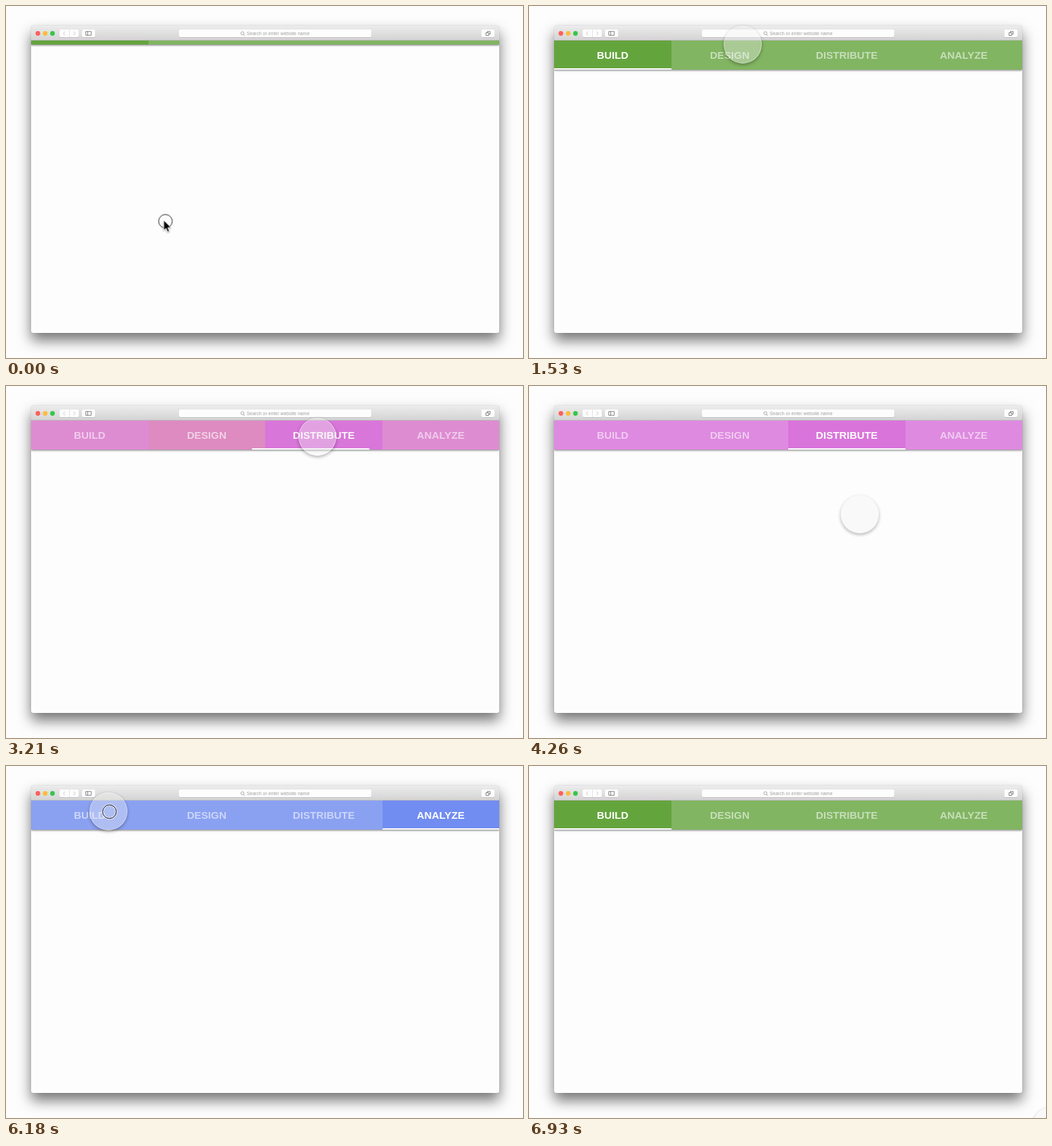
Write an HTML page that moves like this. It is 762 px wide and 520 px high and loops after 7520 ms.

```html
<!DOCTYPE html>
<html lang="en">
<head>
<meta charset="utf-8">
<title>Tab bar</title>
<style>
@property --on { syntax: "<number>"; inherits: true; initial-value: 0; }

html, body { margin: 0; width: 100%; height: 100%; overflow: hidden; background: #fdfdfd; }
body { position: relative; font-family: "Liberation Sans", Arial, sans-serif; }
body * { box-sizing: border-box; }

.bar, .ink, .tab, .pointer, .ring, .arrow, .touch {
  animation: 7520ms ease infinite both;
}

.window {
  position: absolute; left: 37px; top: 29px; width: 690px; height: 454px;
  border-radius: 4px 4px 3px 3px; overflow: hidden; background: #fdfdfd;
  box-shadow: 0 11px 20px rgba(0,0,0,.54), 0 0 1px rgba(0,0,0,.45);
}
.chrome { position: absolute; left: 0; top: 0; display: block; }

.bar {
  position: absolute; left: 0; top: 22px; width: 100%; height: 43px; overflow: hidden;
  box-shadow: 0 1px 3px rgba(0,0,0,.55);
  animation-name: grow, tint;
}
.tab {
  position: absolute; top: 0; width: 172.5px; height: 43px;
  font: bold 15.2px/43px "Liberation Sans", Arial, sans-serif; text-align: center;
  color: rgba(255,255,255,calc(.56 + .44 * var(--on)));
}
.tab::before {
  content: ""; position: absolute; inset: 0; background: var(--c); opacity: var(--on);
}
.tab span { position: relative; }
.tab:nth-child(1) { left: 0; --c: #64a43d; animation-name: build; }
.tab:nth-child(2) { left: 172.5px; --c: #d28040; animation-name: design; }
.tab:nth-child(3) { left: 345px; --c: #d974db; animation-name: distribute; }
.tab:nth-child(4) { left: 517.5px; --c: #718df1; animation-name: analyze; }
.ink {
  position: absolute; left: 0; top: 41px; width: 172.5px; height: 2px; background: #fff;
  animation-name: slide;
}

.pointer {
  position: absolute; left: 0; top: 0; width: 0; height: 0;
  animation-name: travel; animation-timing-function: ease-in-out;
}
.touch {
  position: absolute; left: -28px; top: -28px; width: 56px; height: 56px; border-radius: 50%;
  background: rgba(242,242,242,.36); border: 1px solid rgba(255,255,255,.35);
  box-shadow: 0 2px 5px rgba(0,0,0,.32);
  animation-name: touch; animation-timing-function: linear;
}
.ring {
  position: absolute; left: -9.5px; top: -10.5px; width: 21px; height: 21px; border-radius: 50%;
  border: 1.3px solid #111;
  box-shadow: 0 0 0 1px rgba(255,255,255,.6), inset 0 0 0 1px rgba(255,255,255,.8);
  animation-name: press; animation-timing-function: step-end;
}
.arrow {
  position: absolute; left: -3.5px; top: -3px; overflow: visible;
  filter: drop-shadow(0 1px 1px rgba(0,0,0,.35));
  animation-name: arrow; animation-timing-function: linear;
}

@keyframes grow {
  0%, 16.22% { height: 6px; }
  19.95%, 100% { height: 43px; }
}
@keyframes tint {
  0%, 25.53% { background-color: #81b562; }
  29.52%, 40.29% { background-color: #dc9866; }
  44.28%, 62.63% { background-color: #de8ae0; }
  66.62%, 83.91% { background-color: #8aa1f2; }
  87.9%, 100% { background-color: #81b562; }
}
@keyframes build {
  0%, 25.53% { --on: 1; }
  29.52%, 83.91% { --on: 0; }
  87.9%, 100% { --on: 1; }
}
@keyframes design {
  0%, 25.53% { --on: 0; }
  29.52%, 40.29% { --on: 1; }
  44.28%, 100% { --on: 0; }
}
@keyframes distribute {
  0%, 40.29% { --on: 0; }
  44.28%, 62.63% { --on: 1; }
  66.62%, 100% { --on: 0; }
}
@keyframes analyze {
  0%, 62.63% { --on: 0; }
  66.62%, 83.91% { --on: 1; }
  87.9%, 100% { --on: 0; }
}
@keyframes slide {
  0%, 25.53% { transform: none; }
  29.52%, 40.29% { transform: translateX(172.5px); }
  44.28%, 62.63% { transform: translateX(345px); }
  66.62%, 83.91% { transform: translateX(517.5px); }
  87.9%, 100% { transform: none; }
}
@keyframes travel {
  0%, .7% { transform: translate(233.5px, 317.5px); }
  3.06%, 9.3% { transform: translate(314px, 287.5px); }
  11.7%, 14% { transform: translate(369px, 178px); }
  17%, 21.14% { transform: translate(315px, 57px); }
  24%, 30.32% { transform: translate(305px, 66px); }
  33.24%, 47.2% { transform: translate(459px, 75px); }
  54.39%, 56.5% { transform: translate(487px, 190px); }
  60%, 69% { transform: translate(609px, 87px); }
  70.61%, 74.3% { transform: translate(647px, 334px); }
  79% { transform: translate(172px, 43px); }
  82%, 88.6% { transform: translate(151px, 67px); }
  92.1%, 100% { transform: translate(770px, 532px); }
}
@keyframes press {
  0% { opacity: 1; }
  1.46% { opacity: 0; }
  24.87% { opacity: 1; }
  26.46% { opacity: 0; }
  39.63% { opacity: 1; }
  41.22% { opacity: 0; }
  61.17% { opacity: 1; }
  62.77% { opacity: 0; }
  82.05% { opacity: 1; }
  83.78%, 100% { opacity: 0; }
}
@keyframes arrow {
  0%, 5.2% { opacity: 1; }
  6.2%, 100% { opacity: 0; }
}
@keyframes touch {
  0%, 5.2% { opacity: 0; }
  6.2%, 100% { opacity: 1; }
}
</style>
</head>
<body>
<div class="window">
  <div class="bar">
    <div class="tab"><span>BUILD</span></div>
    <div class="tab"><span>DESIGN</span></div>
    <div class="tab"><span>DISTRIBUTE</span></div>
    <div class="tab"><span>ANALYZE</span></div>
    <div class="ink"></div>
  </div>
  <svg class="chrome" width="690" height="22" viewBox="37 29 690 22">
    <defs>
      <linearGradient id="metal" x2="0" y2="1">
        <stop stop-color="#ececec"/><stop offset="1" stop-color="#d3d3d3"/>
      </linearGradient>
    </defs>
    <rect x="37" y="29" width="690" height="22" fill="url(#metal)"/>
    <rect x="37" y="50" width="690" height="1" fill="#bdbdbd"/>
    <circle cx="47" cy="40.5" r="3.4" fill="#fc605c"/>
    <circle cx="57.8" cy="40.5" r="3.4" fill="#fdbc40"/>
    <circle cx="68.5" cy="40.5" r="3.4" fill="#34c648"/>
    <g fill="#bcbcbc">
      <rect x="79" y="35.4" width="28.5" height="11.3" rx="2"/>
      <rect x="112" y="35.4" width="19.5" height="11.3" rx="2"/>
      <rect x="255" y="35.4" width="283.5" height="11.3" rx="2"/>
      <rect x="700.5" y="35.4" width="19.5" height="11.3" rx="2"/>
    </g>
    <g fill="#fdfdfd">
      <rect x="79" y="34.8" width="28.5" height="11.3" rx="2"/>
      <rect x="112" y="34.8" width="19.5" height="11.3" rx="2"/>
      <rect x="255" y="34.8" width="283.5" height="11.3" rx="2"/>
      <rect x="700.5" y="34.8" width="19.5" height="11.3" rx="2"/>
    </g>
    <path d="M93.5 35v11" stroke="#dcdcdc" stroke-width=".8"/>
    <path d="M87 37.7l-2.4 2.8 2.4 2.8M99.6 37.7l2.4 2.8-2.4 2.8" fill="none" stroke="#bbb" stroke-width=".8"/>
    <g fill="none" stroke="#666" stroke-width=".8">
      <path d="M117.6 37.7h8v5.6h-8zM120.4 37.7v5.6"/>
      <path d="M707.4 39.5h4.2v4h-4.2zM709.4 39.3v-1.7h4.2v4.1h-1.8"/>
    </g>
    <g fill="none" stroke="#8c8c8c" stroke-width=".7">
      <circle cx="348.4" cy="40.2" r="2.3"/>
      <path d="M350 42l2 2.2"/>
    </g>
    <text x="354.7" y="42.9" font-size="6.95" fill="#a0a0a0">Search or enter website name</text>
  </svg>
</div>
<div class="pointer">
  <div class="touch"></div>
  <div class="ring"></div>
  <svg class="arrow" width="16" height="22" viewBox="-2 -2 16 22">
    <path d="M0 0V15L3.4 11.9 5.8 17.4 8.3 16.3 6 10.9H10.8Z" fill="#000" stroke="#fff" stroke-width="1"/>
  </svg>
</div>
</body>
</html>
```
